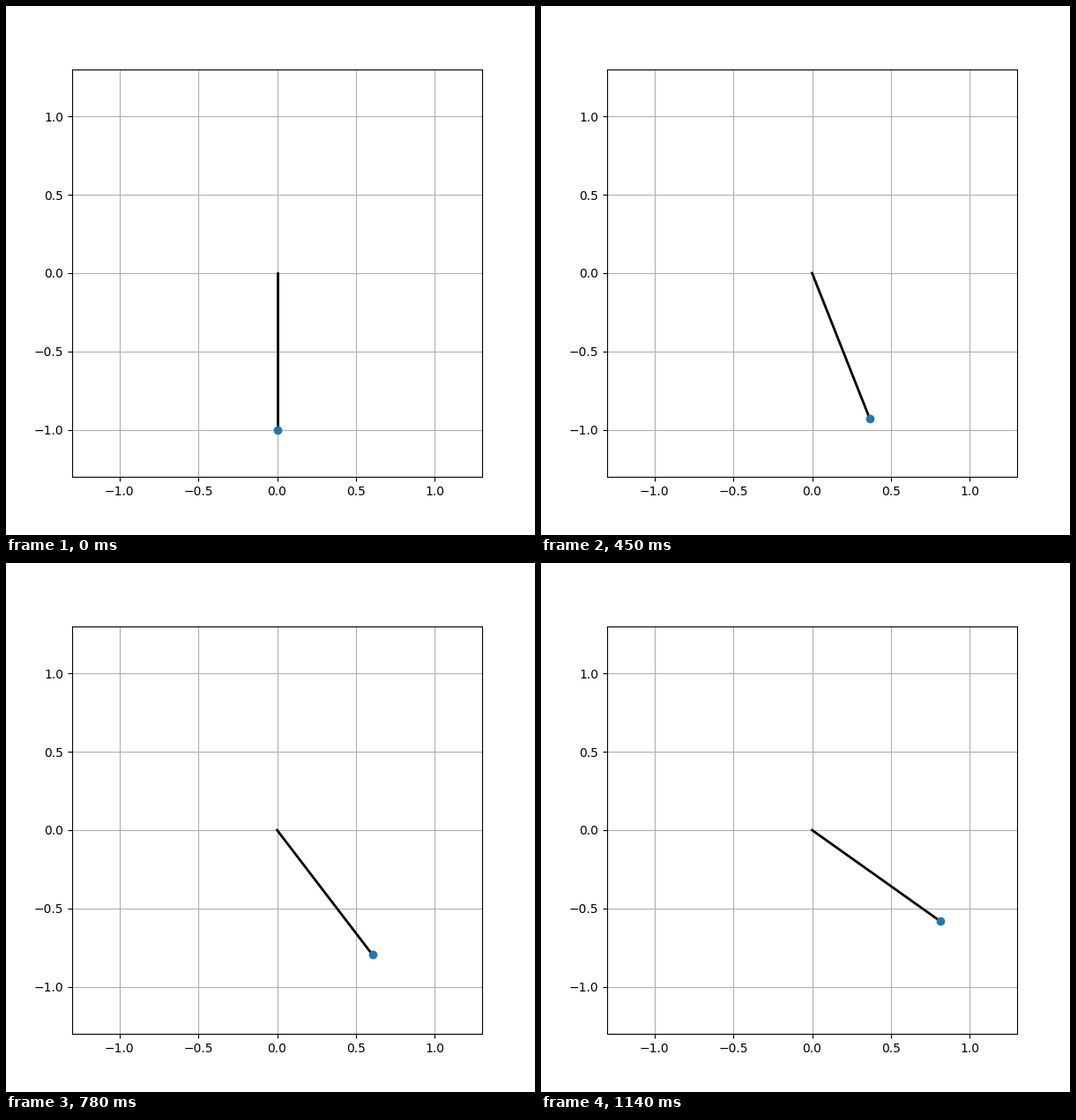
A matplotlib script for the animation above (3.21 s loop, 600x600 px).

```python
import numpy as np
import matplotlib.pyplot as plt
from matplotlib.animation import FuncAnimation

INTERVAL = 30        # ms per frame
FRAMES = 107
SWING_FRAMES = 38    # the rod moves this long, then rests
STEP = 0.025         # radians per frame
LIMIT = 1.3

plt.rcParams["font.family"] = "DejaVu Sans"

fig, ax = plt.subplots(figsize=(6, 6), dpi=100)
ax.set_xlim(-LIMIT, LIMIT)
ax.set_ylim(-LIMIT, LIMIT)
ticks = np.arange(-1, 1.5, 0.5)
ax.set_xticks(ticks)
ax.set_yticks(ticks)
ax.grid()

rod, = ax.plot([0, 0], [0, -1], "k-", lw=2)
bob, = ax.plot([0], [-1], "o", color="tab:blue")


def update(frame):
    angle = STEP * min(frame, SWING_FRAMES)
    x, y = np.sin(angle), -np.cos(angle)
    rod.set_data([0, x], [0, y])
    bob.set_data([x], [y])
    return rod, bob


anim = FuncAnimation(fig, update, frames=FRAMES, interval=INTERVAL,
                     repeat=True, repeat_delay=0)
plt.show()
```
